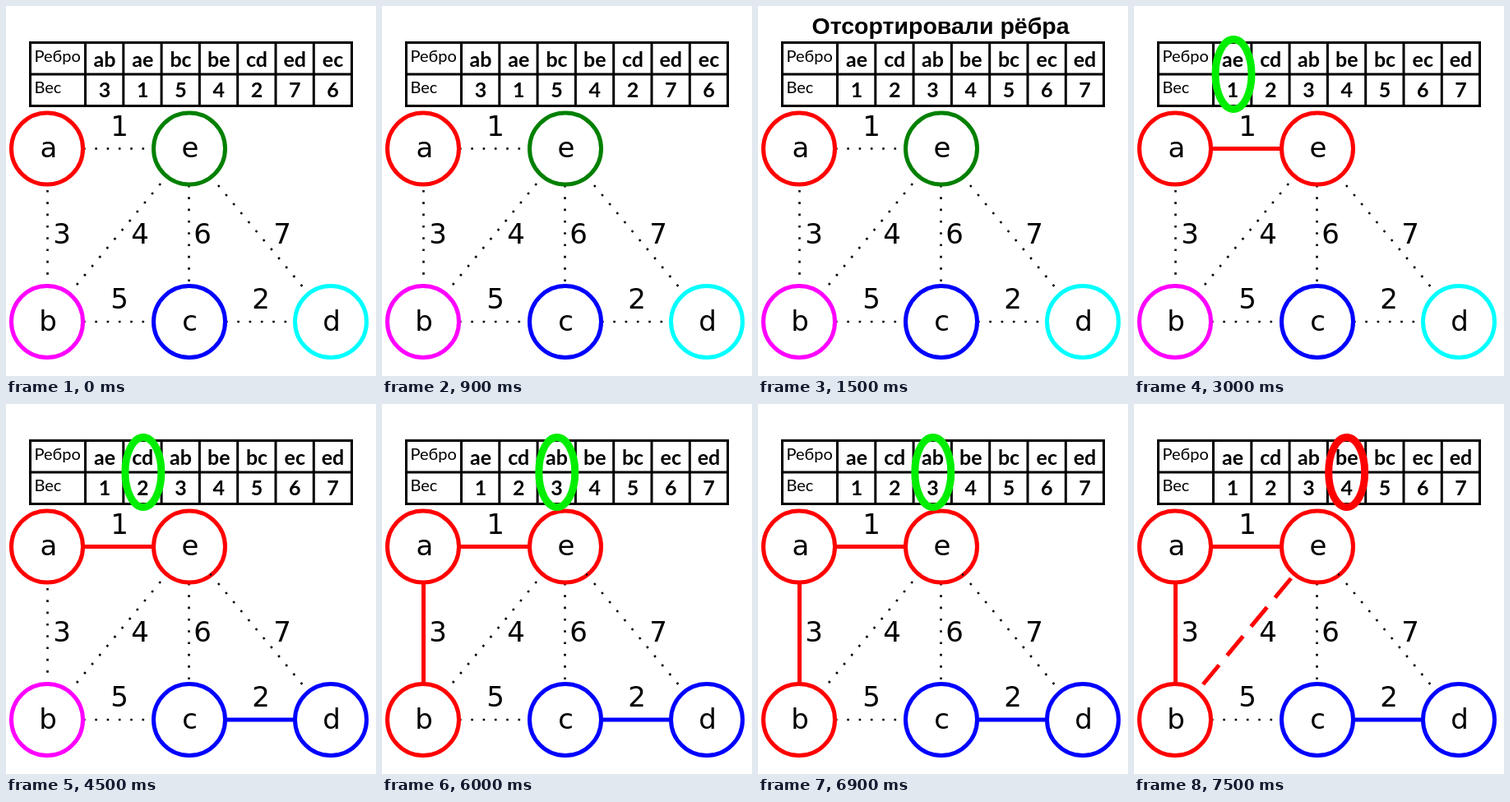
Animation of 450 by 450 pixels, one loop 8000 ms. Source, as an HTML page:

```html
<!DOCTYPE html>
<html lang="ru">
<head>
<meta charset="utf-8">
<title>Минимальное остовное дерево</title>
<style>
  html, body { margin: 0; width: 100%; height: 100%; overflow: hidden; background: #fff; }
  svg { display: block; width: 100vw; height: 100vh; }
  text { text-anchor: middle; }
  .title { font: bold 28.5px "Liberation Sans", Arial, sans-serif; }
  .cell { font: bold 25px Lato, "Open Sans", sans-serif; }
  .head { font: 20px Lato, "Open Sans", sans-serif; text-anchor: start; }
  .graph { font: 34px "DejaVu Sans", sans-serif; }
  .grid { fill: none; stroke: #000; stroke-width: 3; }
  .ring, .mark { fill: none; }
  .ring, .edge { stroke-width: 5; }
  .mark { stroke-width: 9; }
  .dots { stroke: #000; stroke-width: 2.6; stroke-dasharray: 2.6 11.7; }
  .rejected { stroke-dasharray: 30.5 15.2; }
</style>
</head>
<body>
<svg id="stage" viewBox="0 0 450 450"></svg>
<script>
const STEP = 1500, LOOP = 8000;
const RED = '#f00', BLUE = '#00f', GREEN = '#00ee00';
const stage = document.getElementById('stage');

// Colour changes are listed as [step, colour].
const nodes = [
  { name: 'a', x: 50, y: 173.5, tx: 52, color: RED },
  { name: 'e', x: 223, y: 173.5, tx: 224, color: '#008000', change: [2, RED] },
  { name: 'b', x: 50, y: 384, tx: 51, color: '#f0f', change: [4, RED] },
  { name: 'c', x: 223, y: 384, tx: 223.5, color: BLUE },
  { name: 'd', x: 395, y: 384, tx: 396, color: '#0ff', change: [3, BLUE] }
];

const edges = [
  { name: 'ae', weight: 1, label: [138, 158], dots: [94, 173.5, 179, 173.5], line: [92, 173.5, 181, 173.5], change: [2, RED] },
  { name: 'cd', weight: 2, label: [310, 368], dots: [267, 384, 352, 384], line: [266, 384, 353, 384], change: [3, BLUE] },
  { name: 'ab', weight: 3, label: [68, 289], dots: [50.5, 224, 50.5, 342], line: [50.5, 216, 50.5, 342], change: [4, RED] },
  { name: 'be', weight: 4, label: [163, 289], dots: [188, 216, 77, 350], line: [191, 212, 84, 341], change: [5, RED], rejected: true },
  { name: 'bc', weight: 5, label: [138, 368], dots: [94, 384, 179, 384] },
  { name: 'ec', weight: 6, label: [239, 289], dots: [222.5, 218, 222.5, 336] },
  { name: 'ed', weight: 7, label: [336, 289], dots: [258, 218, 362, 343] }
];

const unsorted = ['ab', 'ae', 'bc', 'be', 'cd', 'ed', 'ec'];
const sorted = edges.map(edge => edge.name);
const columnX = i => 120 + i * 46.25;

const text = (cls, x, y, content) => `<text class="${cls}" x="${x}" y="${y}">${content}</text>`;
const line = (cls, [x1, y1, x2, y2], color) =>
  `<line class="${cls}" x1="${x1}" y1="${y1}" x2="${x2}" y2="${y2}"${color ? ` stroke="${color}"` : ''}/>`;

function table(order) {
  let path = 'M29.5 44.5H420.5V121.5H29.5ZM29.5 83H420.5';
  let cells = text('head', 34.5, 68, 'Ребро') + text('head', 34.5, 106, 'Вес');
  order.forEach((name, i) => {
    const { weight } = edges.find(edge => edge.name === name);
    path += `M${96.5 + i * 46.3} 44.5V121.5`;
    cells += text('cell', columnX(i), 73.5, name) + text('cell', columnX(i), 111, weight);
  });
  return `<path class="grid" d="${path}"/>${cells}`;
}

function drawEdge(edge, step) {
  const active = edge.change && step >= edge.change[0];
  const stroke = active
    ? line(edge.rejected ? 'edge rejected' : 'edge', edge.line, edge.change[1])
    : line('dots', edge.dots);
  return stroke + text('graph', ...edge.label, edge.weight);
}

function drawNode(node, step) {
  const color = node.change && step >= node.change[0] ? node.change[1] : node.color;
  return `<circle class="ring" cx="${node.x}" cy="${node.y}" r="43.5" stroke="${color}"/>`
    + text('graph', node.tx, node.y + 10.5, node.name);
}

function mark(step) {
  const color = step === 5 ? RED : GREEN;
  return `<ellipse class="mark" cx="${121 + (step - 2) * 45.9}" cy="83" rx="22" ry="42.5" stroke="${color}"/>`;
}

function draw(step) {
  stage.innerHTML = table(step ? sorted : unsorted)
    + (step === 1 ? text('title', 222, 34, 'Отсортировали рёбра') : '')
    + edges.map(edge => drawEdge(edge, step)).join('')
    + nodes.map(node => drawNode(node, step)).join('')
    + (step >= 3 ? '<circle cx="249" cy="207.5" r="1.3"/>' : '')
    + (step >= 2 ? mark(step) : '');
}

let shown = -1;
const start = performance.now();
function tick(now) {
  const step = Math.floor(Math.max(0, now - start) % LOOP / STEP);
  if (step !== shown) draw(shown = step);
  requestAnimationFrame(tick);
}
tick(start);
</script>
</body>
</html>
```
